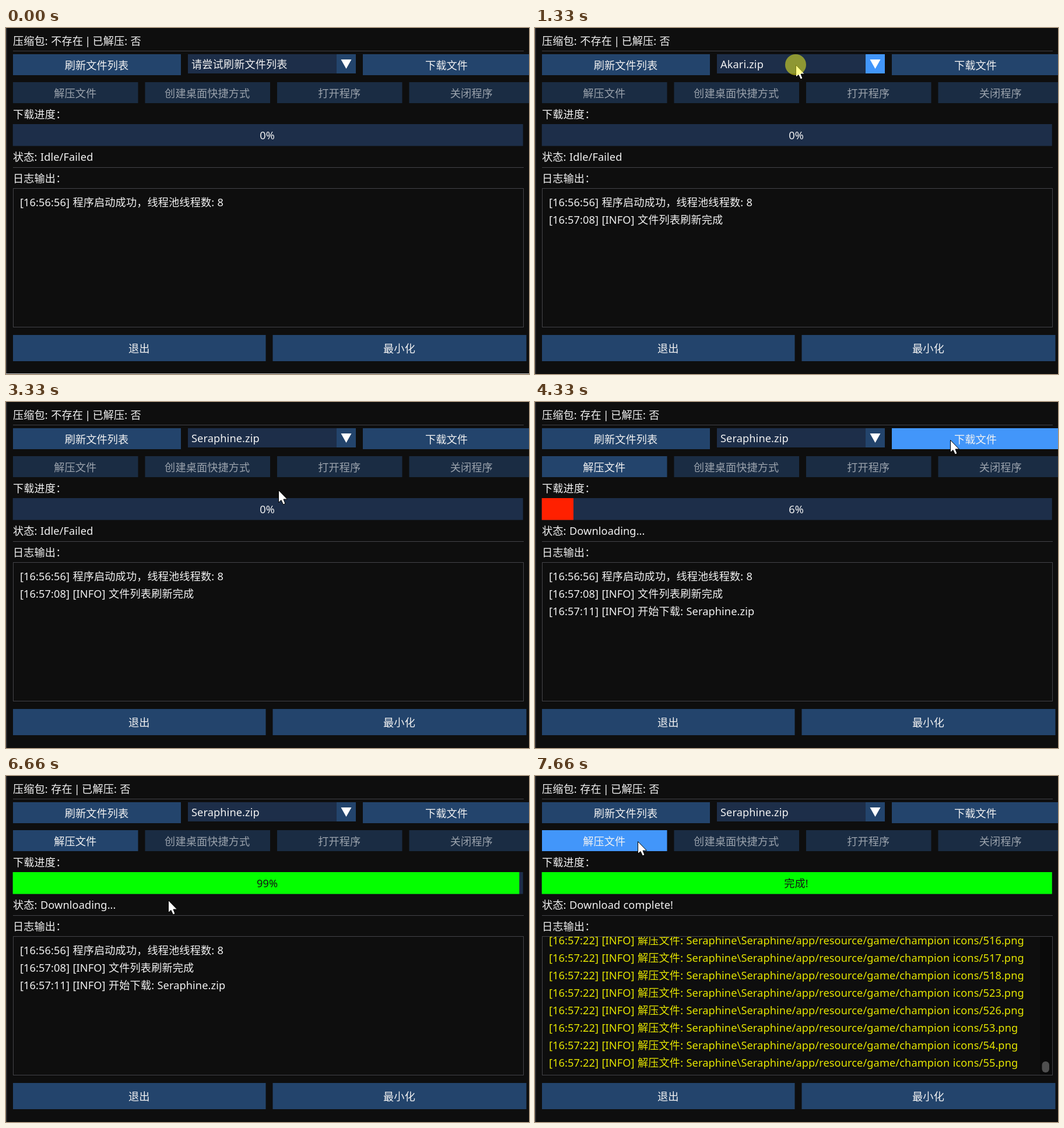
Write an HTML page with a canvas that moves like this. It is 897 by 594 pixels and loops after 7990 ms.

```html
<!DOCTYPE html>
<html lang="zh-CN">
<head>
<meta charset="utf-8">
<style>
  html, body { margin: 0; height: 100%; overflow: hidden; background: #0e0e0e; }
  canvas { display: block; }
</style>
</head>
<body>
<canvas id="stage" width="897" height="594"></canvas>
<script>
const ctx = document.getElementById('stage').getContext('2d');
const LOOP = 7990, TICKS_PER_MS = 3 / 1000;
const LINE = '#434348', TEXT = '#f2f2f2', FRAME = '#1d2e49';
const BUTTON = { normal: '#23446c', disabled: '#1a2c43', hover: '#4296fa', active: '#0f87fa' };
const FILES = ['Akari.zip', 'Frank.zip', 'Seraphine.zip', 'hh-lol-prophet.zip'];
const ICONS = '516 517 518 523 526 53 54 55'.split(' ');
const ARROW = new Path2D('M.5 .5V21.5L5 17.5L8.5 25L12 23.5L9 16H15.5Z');

// Ticks (thirds of a second) at which things happen
const LISTED = 3, OPENED = 4, PICKED = 10, STARTED = 12, SAVED = 13, COMPLETE = 21, UNPACKED = 23;
const PRESSES = [2, OPENED, 22];

// Cursor waypoints: tick, x, y
const PATH = [
  [1, 233, 85], [2, 231, 62], [3, 231, 62], [4, 447, 63], [5, 447, 70], [7, 447, 157],
  [9, 447, 157], [10, 467, 151], [11, 712, 65], [13, 712, 65], [14, 685, 97], [15, 508, 250],
  [17, 478, 262], [19, 420, 275], [20, 278, 213], [22, 176, 112],
];

let tick, mouse;

function cursorAt(tick) {
  const next = PATH.findIndex(point => point[0] > tick);
  if (next === 0) return { x: -50, y: -50 };
  const [from, x0, y0] = PATH.at(next < 0 ? -1 : next - 1);
  const [to, x1, y1] = PATH.at(next);
  const eased = next < 0 ? 0 : 1 - (1 - (tick - from) / (to - from)) ** 2.7;
  return { x: x0 + (x1 - x0) * eased, y: y0 + (y1 - y0) * eased };
}

// Steady start, then a burst
function progressAt(tick) {
  const d = tick - SAVED;
  return d < 0 ? 0 : Math.min(100, 6.2 + 4 * d + 2.41 * Math.max(0, d - 4) ** 3);
}

function rect(x, y, w, h, color) {
  ctx.fillStyle = color;
  ctx.fillRect(x, y, w, h);
}

function outline(x, y, w, h) {
  ctx.strokeStyle = LINE;
  ctx.lineWidth = 1;
  ctx.strokeRect(x + .5, y + .5, w - 1, h - 1);
}

// y is the middle of the line of text
function text(str, x, y, color = TEXT, align = 'left') {
  ctx.fillStyle = color;
  ctx.textAlign = align;
  ctx.fillText(str, x, y + 6.6);
}

function button(label, x, y, w, h, enabled = true) {
  const over = mouse.x > x && mouse.x < x + w && mouse.y > y && mouse.y < y + h;
  const state = !enabled ? 'disabled' : !over ? 'normal' : PRESSES.includes(tick) ? 'active' : 'hover';
  rect(x, y, w, h, BUTTON[state]);
  text(label, x + w / 2 - .5, y + h / 2 + 1, enabled ? TEXT : 'rgba(255,255,255,.56)', 'center');
}

function combo(label, open) {
  rect(312, 45, 255, 33, FRAME);
  rect(567, 45, 33, 33, open ? BUTTON.hover : BUTTON.normal);
  ctx.fillStyle = '#fff';
  ctx.fill(new Path2D('M574.5 54H592.5L583.5 70Z'));
  text(label, 318, 62.5);
}

function popup() {
  const hovered = Math.floor((mouse.y - 87) / 30);
  ctx.globalAlpha = .94;
  rect(312, 79, 288, 136, '#141414');
  ctx.globalAlpha = 1;
  outline(312, 79, 288, 136);
  FILES.forEach((file, i) => {
    const y = 87.5 + 30 * i;
    if (i === hovered) rect(313, y, 286, 30, '#397ccc');
    else if (i === 0) rect(313, y, 286, 30, 'rgba(66,150,250,.31)');
    text(file, 318, y + 15.5);
  });
}

function progressBar(percent) {
  const p = percent / 100, channel = v => Math.round(255 * Math.min(1, v));
  rect(11.7, 165, 875, 37.5, FRAME);
  rect(11.7, 165, 875 * p, 37.5, `rgb(${channel(2 - 2 * p)},${channel(2 * p)},0)`);
  const label = percent === 100 ? '完成!' : Math.floor(percent) + '%';
  text(label, 448, 184, p > .5 ? '#141414' : TEXT, 'center');
}

function log() {
  outline(12, 275, 876, 239);
  ctx.save();
  ctx.beginPath();
  ctx.rect(13, 276, 874, 237);
  ctx.clip();
  if (tick < UNPACKED) {
    text('[16:56:56] 程序启动成功，线程池线程数: 8', 24, 299.5);
    if (tick >= LISTED) text('[16:57:08] [INFO] 文件列表刷新完成', 24, 329.5);
    if (tick >= STARTED) text('[16:57:11] [INFO] 开始下载: Seraphine.zip', 24, 359.5);
  } else {
    const path = '[16:57:22] [INFO] 解压文件: Seraphine\\Seraphine/app/resource/game/champion icons/';
    ICONS.forEach((n, i) => text(path + n + '.png', 24, 282 + 30 * i, '#e6e600'));
    rect(866, 276, 21, 237, '#0a0a0a');
    ctx.fillStyle = '#4f4f4f';
    ctx.beginPath();
    ctx.roundRect(869.5, 490, 12.5, 19, 6);
    ctx.fill();
  }
  ctx.restore();
}

function cursor() {
  ctx.save();
  ctx.translate(mouse.x, mouse.y);
  ctx.fillStyle = '#fff';
  ctx.fill(ARROW);
  ctx.strokeStyle = '#000';
  ctx.lineWidth = 1;
  ctx.stroke(ARROW);
  if (PRESSES.includes(tick)) {
    ctx.beginPath();
    ctx.arc(0, 0, 18, 0, 7);
    ctx.fillStyle = 'rgba(255,255,30,.5)';
    ctx.fill();
  }
  ctx.restore();
}

function draw(ms) {
  tick = Math.floor((ms + 8) * TICKS_PER_MS);
  mouse = cursorAt(tick);
  const saved = tick >= SAVED, open = tick >= OPENED && tick < PICKED;

  ctx.font = '18.2px "Noto Sans", "Noto Sans CJK SC", sans-serif';
  ctx.letterSpacing = '.1px';
  ctx.wordSpacing = '.5px';
  rect(0, 0, 897, 594, '#0e0e0e');
  rect(0, 0, 1.5, 594, '#3a3a3e');
  if (tick < 2) rect(0, 593, 897, 1, '#c8c8c8');

  text(`压缩包: ${saved ? '' : '不'}存在\u2009|\u2009已解压: 否`, 12, 22.5);
  rect(12, 39, 876, 1, LINE);
  button('刷新文件列表', 12, 45, 288, 36);
  combo(tick < LISTED ? '请尝试刷新文件列表' : FILES[tick < PICKED ? 0 : 2], open);
  button('下载文件', 612, 45, 288, 36);
  ['解压文件', '创建桌面快捷方式', '打开程序', '关闭程序'].forEach((label, i) =>
    button(label, 12 + 226.5 * i, 93, 214.5, 36, i === 0 && saved));

  text('下载进度：', 12, 148.5);
  progressBar(progressAt(tick));
  const status = tick < STARTED ? 'Idle/Failed' : tick < COMPLETE ? 'Downloading...' : 'Download complete!';
  text('状态: ' + status, 12, 221.5);
  rect(12, 239, 876, 1, LINE);

  text('日志输出：', 12, 258);
  log();
  button('退出', 12, 527, 433.5, 45);
  button('最小化', 457.5, 527, 435, 45);
  if (open && tick > OPENED) popup();
  cursor();
}

function frame() {
  draw(performance.now() % LOOP);
  requestAnimationFrame(frame);
}
frame();
</script>
</body>
</html>
```
